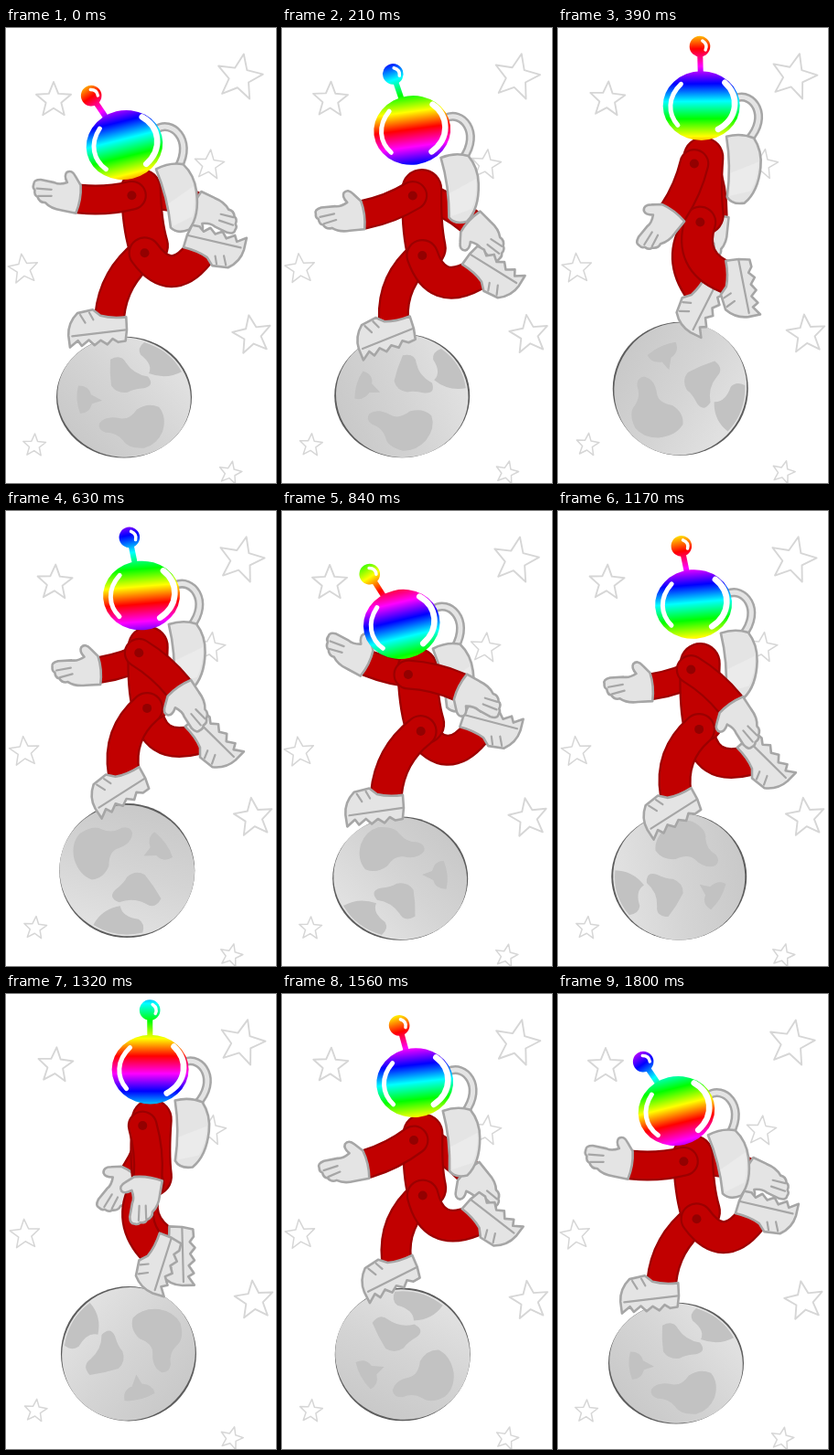
An HTML page that plays this animation: 295x498 px, repeating every 1.83 s.

```html
<!DOCTYPE html>
<html lang="en">
<head>
<meta charset="utf-8">
<title>Astronaut on the moon</title>
<style>
  html, body { margin: 0; width: 100%; height: 100%; overflow: hidden; background: #fff; }
  svg { display: block; width: 100vw; height: 100vh; }
  .grey { fill: #e4e4e4; stroke: #a6a6a6; stroke-width: 2.6; stroke-linejoin: round; stroke-linecap: round; }
  .line { fill: none; stroke: #a6a6a6; stroke-width: 2.2; stroke-linecap: round; }
  .edge, .suit { fill: none; stroke-linecap: round; stroke-linejoin: round; }
  .edge { stroke: #9c0000; }
  .suit { stroke: #c10000; }
  .dot { fill: #930000; }
  .shine { fill: none; stroke: #fff; stroke-linecap: round; }
</style>
</head>
<body>
<svg viewBox="0 0 295 498">
  <defs>
    <linearGradient id="rainbow" gradientUnits="userSpaceOnUse" x1="0" y1="0" x2="0" y2="115" spreadMethod="repeat">
      <stop offset="0" stop-color="#f00"/>
      <stop offset=".1667" stop-color="#f0f"/>
      <stop offset=".3333" stop-color="#00f"/>
      <stop offset=".5" stop-color="#0ff"/>
      <stop offset=".6667" stop-color="#0f0"/>
      <stop offset=".8333" stop-color="#ff0"/>
      <stop offset="1" stop-color="#f00"/>
    </linearGradient>
    <linearGradient id="moonlight">
      <stop offset="0" stop-color="#c9c9c9"/>
      <stop offset=".5" stop-color="#d4d4d4"/>
      <stop offset="1" stop-color="#e2e2e2"/>
    </linearGradient>
    <g id="hand">
      <path class="grey" d="M1 15L8 24Q13 31 18 27Q21 23 16 16Q24 12 30 14L45 15Q53 14 52 9Q53 5 50 3Q50 -3 46 -4Q43 -10 37 -9Q30 -15 18 -15L2 -16Q-2 0 1 15Z"/>
      <path class="line" d="M32 6L48 5M31 -1L45 -3"/>
    </g>
    <g id="boot">
      <path class="grey" d="M-18 -8L-35 -5Q-46 5 -46 19L-45 32L-36 25L-32 31L-24 25L-18 31L-11 26L-4 31L2 25L8 29L16 28L18 16L18 2Q2 3 -10 -1Z"/>
      <path class="line" d="M-42 20L17 16M-32 -3L-27 6M-22 -5L-18 3"/>
    </g>
  </defs>
  <g id="stars" fill="none" stroke="#d6d6d6" stroke-linejoin="round"></g>
  <g id="moon">
    <circle r="74" fill="#5c5c5c"/>
    <g id="globe">
      <ellipse rx="72" ry="74" transform="rotate(-40)" fill="url(#moonlight)"/>
      <g fill="#c2c2c2">
        <path d="M-50 -14Q-38 -14 -36 -3L-24 4L-35 8Q-38 20 -48 20Q-54 2 -50 -14Z"/>
        <path d="M-15 -46Q-3 -53 2 -42Q10 -28 26 -25Q34 -14 22 -11Q10 -10 4 -6Q-8 -4 -14 -14Q-16 -30 -15 -46Z"/>
        <path d="M63 -31Q46 -21 27 -29Q32 -40 18 -52Q14 -60 22 -67A71 71 0 0 1 63 -31Z"/>
        <path d="M-27 32Q-20 22 -4 26Q6 28 14 15Q26 6 38 12Q47 24 42 42Q36 58 22 62Q4 63 -1 53Q-8 43 -20 43Q-29 40 -27 32Z"/>
      </g>
    </g>
  </g>
  <g id="farArm"></g>
  <g id="farLeg"></g>
  <g id="torso"></g>
  <g id="head">
    <path class="line" style="stroke-width:10" d="M38 -8C56 -15 75 12 51 38"/>
    <path class="line" style="stroke-width:5;stroke:#e4e4e4" d="M38 -8C56 -15 75 12 51 38"/>
    <path class="grey" d="M27 34Q43 30 57 36Q66 50 64 68Q61 95 46 107Q32 109 27 100Q32 66 27 34Z"/>
    <path d="M31 74L62 62Q61 80 53 94L30 99Z" fill="#ebebeb"/>
    <g id="antenna">
      <path d="M0 -34V-60" fill="none" stroke="url(#rainbow)" stroke-width="6"/>
      <circle cy="-65" r="11.3" fill="url(#rainbow)"/>
      <path class="shine" stroke-width="3.5" d="M3 -71Q9 -67 6 -61"/>
    </g>
    <ellipse rx="42" ry="37.8" fill="url(#rainbow)"/>
    <path class="shine" stroke-width="5" d="M-22 -24C-37 -10 -37 8 -26 21"/>
    <path class="shine" stroke-width="6.5" d="M26 -25C42 -10 40 14 18 26"/>
  </g>
  <g id="nearLeg"></g>
  <g id="nearArm"></g>
</svg>
<script>
const LOOP = 1830, CYCLE = 1800, HALF = CYCLE / 2, STEP = 30, RAD = Math.PI / 180;
const $ = id => document.getElementById(id);
const set = (el, attrs) => { for (const k in attrs) el.setAttribute(k, attrs[k]); };
const add = (parent, tag, attrs) => {
  const el = document.createElementNS("http://www.w3.org/2000/svg", tag);
  set(el, attrs);
  return parent.appendChild(el);
};

// Steps taken so far: eases in and out of each half cycle.
function steps(t) {
  const p = (t % HALF) / HALF, a = p ** 1.8, b = (1 - p) ** 1.8;
  return Math.floor(t / HALF) + a / (a + b);
}

// Limb swing, from 1 to -1 in one step and back in the next.
function swing(t) {
  const n = steps(t % CYCLE);
  return n < 1 ? 1 - 2 * n : 2 * n - 3;
}

// Each pose gives an angle (forward of straight down), reach, bend and tip angle.
const armPose = (mean, range) => s => {
  const angle = mean + range * s;
  return { angle, reach: 57, bend: 5, tip: angle + 102 };
};
const legPose = s => ({
  angle: -10 - 59 * s - 20 * s * s,
  reach: 69 - 10 * s,
  bend: -28 - 11 * s,
  tip: -78 - 80 * s - 5 * s * s
});

function tube(parent, width) {
  const edge = add(parent, "path", { class: "edge", "stroke-width": width });
  const suit = add(parent, "path", { class: "suit", "stroke-width": width - 4.5 });
  return d => { set(edge, { d }); set(suit, { d }); };
}

function limb(id, pose, tipShape, width, delay) {
  const parent = $(id), shape = tube(parent, width);
  const dot = add(parent, "circle", { class: "dot", r: 5 });
  const end = add(parent, "use", { href: "#" + tipShape });
  return (t, x, y) => {
    const { angle, reach, bend, tip } = pose(swing(t + delay));
    const sin = Math.sin(angle * RAD), cos = Math.cos(angle * RAD);
    const ex = x - reach * sin, ey = y + reach * cos;
    const bx = (x + ex) / 2 + bend * cos, by = (y + ey) / 2 + bend * sin;
    shape(`M${x} ${y}Q${bx} ${by} ${ex} ${ey}`);
    set(dot, { cx: x, cy: y });
    set(end, { transform: `translate(${ex} ${ey}) rotate(${tip})` });
  };
}

const farArm = limb("farArm", armPose(12, 92), "hand", 30, HALF);
const nearArm = limb("nearArm", armPose(4, 82), "hand", 33, 0);
const farLeg = limb("farLeg", legPose, "boot", 34, HALF);
const nearLeg = limb("nearLeg", legPose, "boot", 36, 0);
const torso = tube($("torso"), 45);

function starPath(r) {
  const points = Array.from({ length: 10 }, (_, i) => {
    const a = i * Math.PI / 5, d = i % 2 ? r * 0.44 : r;
    return `${d * Math.sin(a)} ${-d * Math.cos(a)}`;
  });
  return `M${points.join("L")}Z`;
}

// x, y, radius
const stars = [
  [52, 79, 20], [255, 54, 26], [222, 150, 17], [19, 264, 17],
  [269, 336, 22], [31, 457, 13], [245, 487, 13]
].map(([x, y, r], i) => {
  const el = add($("stars"), "path", { d: starPath(r), "stroke-width": r > 19 ? 1.9 : 1.5 });
  const angle = 11 * Math.sin(1.3 * i);
  return sway => set(el, {
    transform: `translate(${x + 0.1 * r * sway} ${y - 0.7 * sway}) rotate(${angle + 4 * sway})`
  });
});

function draw(time) {
  const t = time % CYCLE;
  const phase = 2 * Math.PI * t / HALF;
  const cos = Math.cos(phase), sin = Math.sin(phase);

  stars.forEach(move => move((1 - cos) / 2));

  // The moon dips and flattens under each landing, and turns half round per step.
  const mx = 131.5 - 2.5 * cos, my = 398.5 + 6.5 * Math.cos(phase - 0.55);
  const squash = 0.95 - 0.06 * Math.cos(phase - 0.5);
  set($("moon"), { transform: `translate(${mx} ${my}) scale(1 ${squash})` });
  set($("globe"), { transform: `rotate(${180 * steps(t)})` });

  const sx = 143.4 - 6 * cos;
  const sy = 167 + 21 * cos + 9.6 * sin - 4.8 * Math.cos(2 * phase);
  const px = 153.5 - 2 * cos, py = sy + 63 + 2.5 * sin;
  farArm(t, sx + 12, sy);
  nearArm(t, sx, sy);
  farLeg(t, px, py);
  nearLeg(t, px, py);
  torso(`M${sx + 10} ${sy - 7}Q${(sx + px) / 2 + 4} ${(sy + py) / 2} ${px + 4} ${py - 8}`);

  const hx = 143.7 - 14.2 * cos, hy = 104.5 + 24 * Math.cos(phase - 0.21);
  set($("head"), { transform: `translate(${hx} ${hy}) rotate(${-7 - 7 * cos})` });
  set($("antenna"), { transform: `rotate(${-10 - 10 * cos})` });

  const hue = 160 + 28.05 * time / STEP;
  set($("rainbow"), { gradientTransform: `translate(0 ${hue % 360 / 360 * 115})` });
}

const start = performance.now();
function tick() {
  const time = (performance.now() - start) % LOOP;
  draw(Math.floor(time / STEP) * STEP);
  requestAnimationFrame(tick);
}
tick();
</script>
</body>
</html>
```
